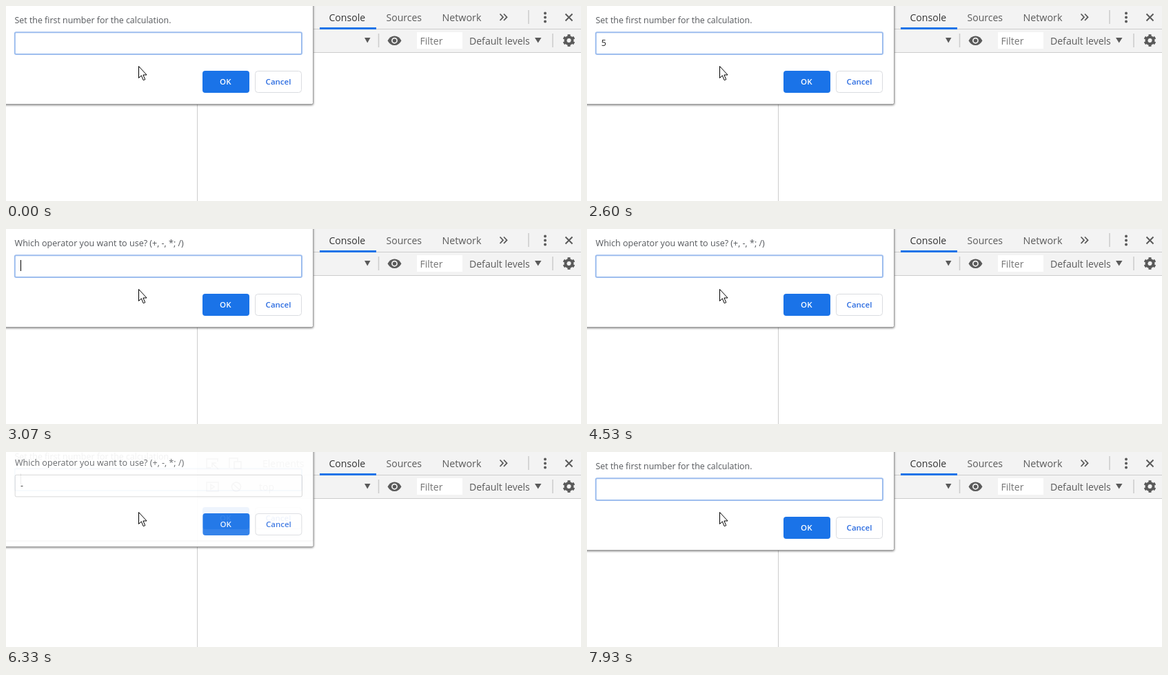
Recreate the animation shown at these times as an HTML page. Size 834x283 px, loop 8000 ms.

```html
<!DOCTYPE html>
<html lang="en">
<head>
<meta charset="utf-8">
<title>Prompt dialogs</title>
<style>
html, body { margin: 0; width: 100%; height: 100%; overflow: hidden; background: #fff; }
svg { display: block; width: 834px; height: 283px; }
text { font-family: "Open Sans", "Noto Sans", sans-serif; white-space: pre; }
.tools text { font-size: 14.05px; fill: #5a5a5a; }
.tools .on { fill: #333; }
.tools .hint { fill: #757575; }
.line { stroke: #ccc; fill: none; }
.icon { stroke: #5a5a5a; fill: none; }
.solid { fill: #5a5a5a; }
.sheet { fill: #fff; stroke: #a0a0a0; filter: drop-shadow(0 1px 1.5px rgba(0,0,0,.5)); }
.msg { fill: #55585c; }
.val { font-size: 12.4px; fill: #222; }
.field { fill: #fff; stroke: #d5d5d5; }
.focus .field { stroke: #9dbdee; stroke-width: 2; }
.btn { font-size: 11.5px; font-weight: 600; text-anchor: middle; }
</style>
</head>
<body>
<svg viewBox="0 0 834 283">
  <g class="tools">
    <path fill="#f3f3f3" d="M278 0H834V67H278z"/>
    <path class="line" d="M277.5 0V283M278 33.5H834M278 67.5H834"/>
    <path class="line" stroke-width="1.5" d="M758 6V26M540.5 40V60M793 40V60"/>

    <path class="icon" stroke-width="1.5" d="M307 14V10H291V23H297M299 16L308 25M299 22V16H305M324 23V9H336V13M331 14H341V24H331z"/>
    <text x="372" y="22">Elements</text>
    <path class="icon" stroke-width="1.5" d="M291 44H308V57H291zM297 47L302 50.5L297 54zM329 46L339 55"/>
    <circle class="icon" stroke-width="1.5" cx="334" cy="50.5" r="6.5"/>
    <text x="367" y="56">top</text>

    <path fill="#1a73e8" d="M455 31H537V34H455z"/>
    <text class="on" x="468.5" y="22">Console</text>
    <text x="551.5" y="22">Sources</text>
    <text x="632.5" y="22" style="font-size:14.3px">Network</text>
    <path class="icon" stroke-width="1.8" d="M716.5 11.5L721 16.2L716.5 21M722 11.5L726.5 16.2L722 21"/>
    <path class="icon" stroke-width="2" d="M811.5 11.5L821.5 21.5M821.5 11.5L811.5 21.5"/>
    <g class="solid">
      <circle cx="782" cy="10.5" r="2"/><circle cx="782" cy="16.5" r="2"/><circle cx="782" cy="22.5" r="2"/>
      <path d="M520 46H528.5L524.2 53.5zM767 46H776.5L771.7 53.5z"/>
      <path d="M553.5 50.2Q557 43.5 563.5 43.5T573.5 50.2Q570 57 563.5 57T553.5 50.2z"/>
    </g>
    <circle cx="563.5" cy="50.2" r="3.6" fill="none" stroke="#f3f3f3" stroke-width="1.7"/>
    <path fill="#fff" d="M596 38H662V62H596z"/>
    <text class="hint" x="600.5" y="56">Filter</text>
    <text x="672" y="56">Default levels</text>
    <g class="icon" transform="rotate(15 816.5 50)">
      <circle cx="816.5" cy="50" r="5" stroke-width="4"/>
      <circle cx="816.5" cy="50" r="7.4" stroke-width="3" pathLength="12" stroke-dasharray="1 1"/>
    </g>
  </g>

  <g id="dialogs"></g>

  <path fill="#fff" stroke="#000" d="M192.5 87.5V104.5L196.3 100.9L199.2 107.7L201.8 106.6L198.9 100H204.1z"/>
</svg>
<script>
const LOOP = 8000, STEP = 70;
const NUMBER = ["Set the first number for the calculation.", 12.43];
const OPERATOR = ["Which operator you want to use? (+, -, *; /)", 12.57];

// start, message, typed value, caret x (0 = hidden)
const states = [
  [0, NUMBER, "", 0], [200, NUMBER, "", 21], [730, NUMBER, "", 0],
  [1270, NUMBER, "", 21], [1800, NUMBER, "", 0],
  [2070, NUMBER, "5", 28], [2600, NUMBER, "5", 0],
  [2930, OPERATOR, "", 21], [3470, OPERATOR, "", 0], [4000, OPERATOR, "", 21],
  [4530, OPERATOR, "", 0], [5000, OPERATOR, "", 21],
  [5330, OPERATOR, "-", 26], [5870, OPERATOR, "-", 0],
  [6330, NUMBER, "", 21], [6870, NUMBER, "", 0], [7400, NUMBER, "", 21], [7930, NUMBER, "", 0]
];

// the leaving and entering dialog at each step of a swap: [x, y, opacity]
const swap = [
  { out: [0.4, -5, 0.95], in: [0, -14, 0.07] },
  { out: [0.4, -10, 0.35], in: [0, -5, 0.82] }
];

function makeDialog() {
  const g = document.createElementNS("http://www.w3.org/2000/svg", "g");
  g.innerHTML = `
    <path class="sheet" d="M-10 -40H445.5V140.5Q445.5 142.5 443.5 142.5H-10z"/>
    <text class="msg" x="12.5" y="25"></text>
    <rect class="field" x="12.8" y="38.3" width="416.2" height="31.6" rx="2"/>
    <text class="val" x="20.7" y="58"></text>
    <rect class="caret" y="45" width="1" height="16"/>
    <rect x="285" y="94" width="68" height="32" rx="4" fill="#1a73e8"/>
    <text class="btn" x="318.3" y="114" fill="#fff">OK</text>
    <rect x="361.5" y="94.5" width="67" height="31" rx="4" fill="#fff" stroke="#dadce0"/>
    <text class="btn" x="395" y="114" fill="#2a6be0">Cancel</text>`;
  document.getElementById("dialogs").append(g);
  const [msg, val, caret] = ["msg", "val", "caret"].map(c => g.querySelector("." + c));
  return { g, msg, val, caret };
}

const leaving = makeDialog(), entering = makeDialog();

function show(d, [, [label, size], value, caretX], [x, y, alpha], focus) {
  d.msg.textContent = label;
  d.msg.style.fontSize = size + "px";
  d.val.textContent = value;
  d.caret.setAttribute("x", caretX);
  d.caret.setAttribute("visibility", caretX ? "inherit" : "hidden");
  d.g.setAttribute("transform", `translate(${x} ${y})`);
  d.g.setAttribute("opacity", alpha);
  d.g.setAttribute("class", focus ? "focus" : "");
}

function draw() {
  const t = performance.now() % LOOP;
  const i = states.findLastIndex(s => s[0] <= t);
  const now = states[i], before = states[i - 1];
  const step = before && before[1] !== now[1] ? swap[Math.floor((t - now[0]) / STEP)] : null;
  show(entering, now, step ? step.in : [0, 0, 1], true);
  leaving.g.setAttribute("visibility", step ? "visible" : "hidden");
  if (step) show(leaving, before, step.out, false);
  requestAnimationFrame(draw);
}
draw();
</script>
</body>
</html>
```
